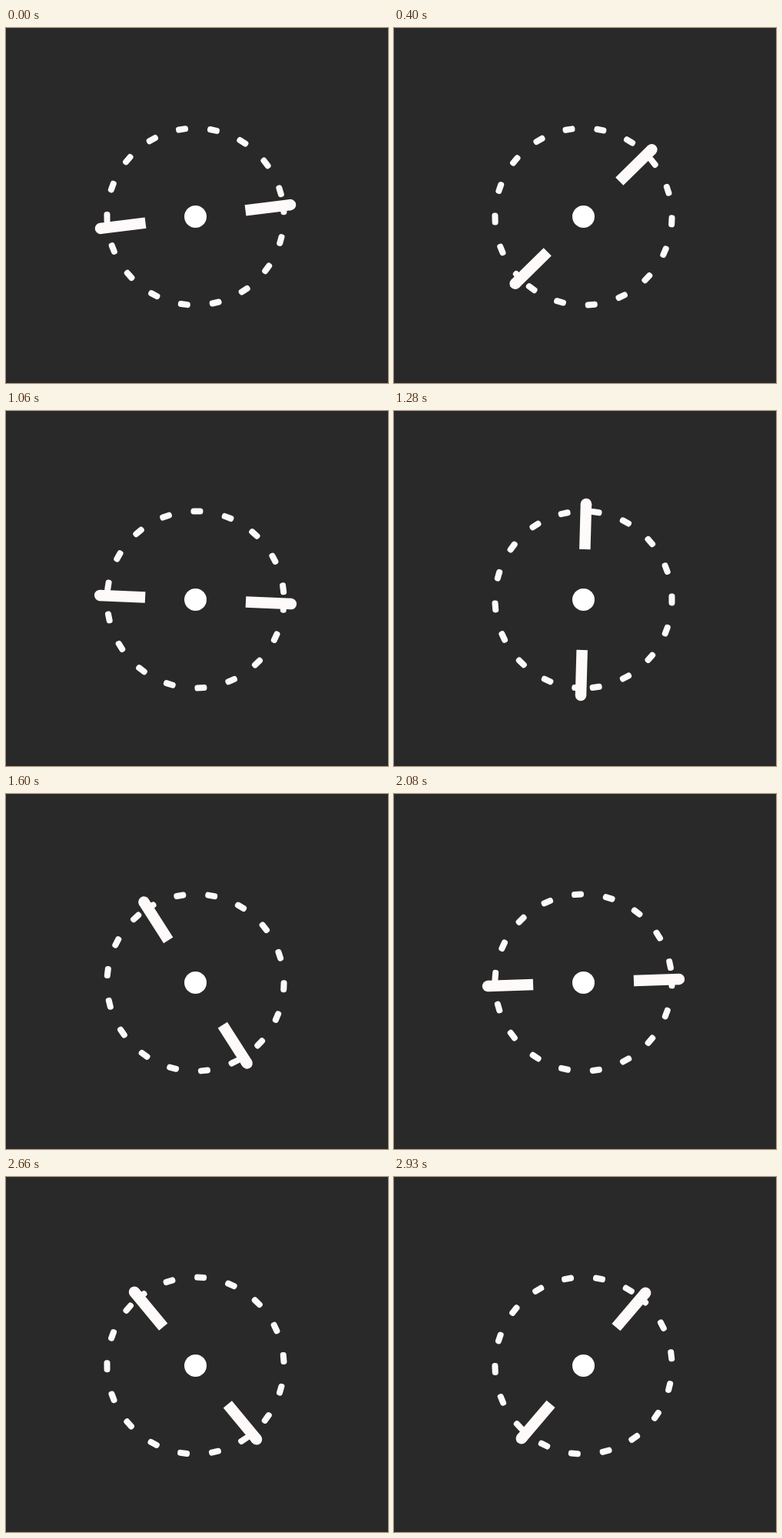
Animation of 497 by 462 pixels, one loop 3.02 s. Source, as an HTML page with a canvas:

```html
<!DOCTYPE html>
<html lang="en">
<head>
<meta charset="utf-8">
<title>Spinning wheel</title>
<style>
  html, body { margin: 0; width: 100%; height: 100%; overflow: hidden; background: #292929; }
  canvas { display: block; }
</style>
</head>
<body>
<canvas id="stage" width="497" height="462"></canvas>
<script>
const ctx = document.getElementById('stage').getContext('2d');
const LOOP = 3020;
const CENTER = [246.5, 245.5];

// The picture advances in ticks: [count, ms per tick].
const TICKS = [[8, 80], [8, 70], [16, 80], [6, 90]];

// One turn, eased: [ticks since start of turn, degrees].
const TURN = 13.2;
const EASE = [
  [0, -7.1], [0.6, -2.1], [1.8, 26], [2.8, 55.5], [3.8, 91.6], [4.6, 120.7],
  [5.7, 161.5], [6.8, 202], [7.8, 237.4], [9, 271.5], [10, 296.9],
  [10.6, 310.4], [11.7, 332], [12.8, 349.3], [TURN, 352.9]
];

const DASHES = 18, DASH_START = 2, DASH_STEP = 20.49;
const radians = degrees => degrees * Math.PI / 180;

function tickAt(ms) {
  let tick = 0;
  for (const [count, length] of TICKS) {
    if (ms < count * length) return tick + Math.floor(ms / length);
    ms -= count * length;
    tick += count;
  }
  return tick - 1;
}

function angleAt(tick) {
  const phase = tick % TURN;
  const next = EASE.findIndex(([p]) => p > phase);
  const [p0, a0] = EASE[next - 1], [p1, a1] = EASE[next];
  return a0 + (a1 - a0) * (phase - p0) / (p1 - p0);
}

function disc(x, y, radius) {
  ctx.beginPath();
  ctx.arc(x, y, radius, 0, 2 * Math.PI);
  ctx.fill();
}

function rotated(degrees, paint) {
  ctx.save();
  ctx.rotate(radians(degrees));
  paint();
  ctx.restore();
}

function dash() {
  ctx.beginPath();
  ctx.roundRect(111, -8, 8, 16, 3.6);
  ctx.fill();
}

function bar() {
  ctx.fillRect(65.5, -7.25, 59, 14.5);
  disc(124.5, 0, 7.25);
}

function draw() {
  const angle = angleAt(tickAt(performance.now() % LOOP));
  ctx.fillStyle = '#292929';
  ctx.fillRect(0, 0, 497, 462);
  ctx.save();
  ctx.translate(...CENTER);
  ctx.fillStyle = '#fff';
  disc(0, 0, 14.5);
  ctx.fillStyle = '#fffafa';
  for (let i = 0; i < DASHES; i++) rotated(angle + DASH_START + i * DASH_STEP, dash);
  rotated(angle, bar);
  rotated(angle + 180, bar);
  ctx.restore();
  requestAnimationFrame(draw);
}
draw();
</script>
</body>
</html>
```
